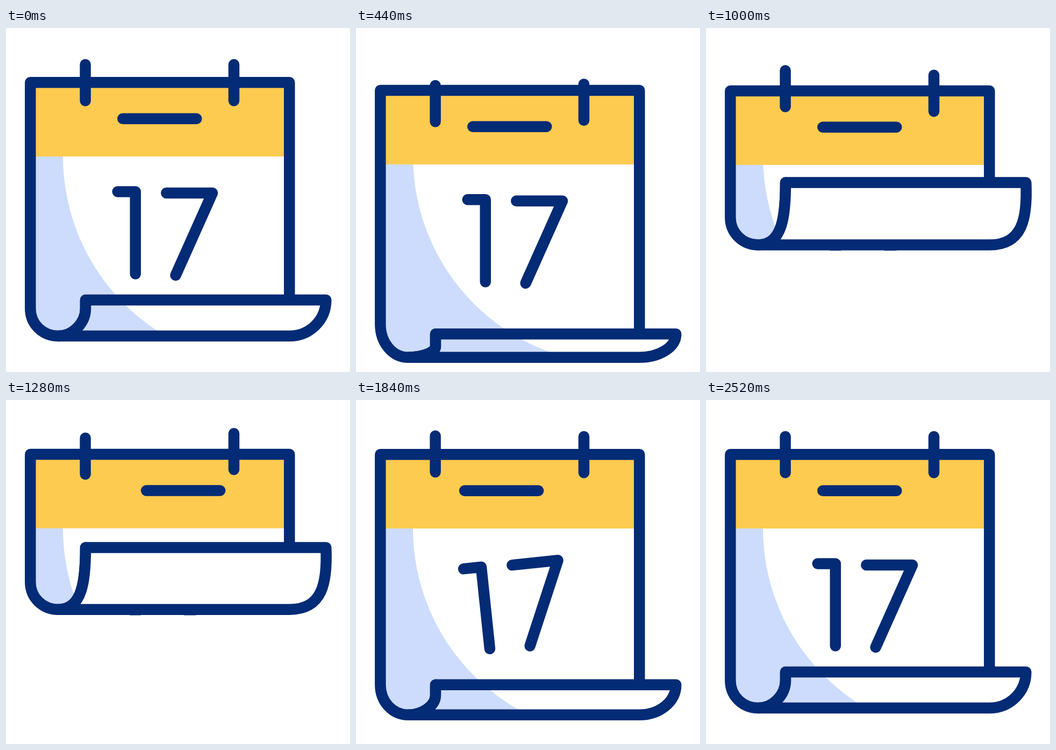
An HTML page with a canvas that plays this animation: 640 px wide and 640 px high, repeating every 2.88 s.

```html
<!DOCTYPE html>
<html lang="en">
<head>
<meta charset="utf-8">
<title>Calendar</title>
<style>
  html, body { margin: 0; width: 100%; height: 100%; overflow: hidden; background: #fff; }
  canvas { display: block; width: 640px; height: 640px; }
</style>
</head>
<body>
<canvas id="stage" width="640" height="640"></canvas>
<script>
const ctx = document.getElementById('stage').getContext('2d');
const NAVY = '#042b75', YELLOW = '#fdcb50', SHADE = '#cddcfc';
const LOOP = 2880, STEP = 40;
const TOP = 101.3, LEFT = 45.3, RIGHT = 527.3, CURL = 148, TIP = 595.3, BASE = 97;

// Symmetric cubic-bezier(k, 0, 1 - k, 1)
function ease(u, k) {
  let lo = 0, hi = 1, s = u;
  for (let i = 0; i < 24; i++) {
    s = (lo + hi) / 2;
    const x = 3 * (1 - s) * s * ((1 - s) * k + s * (1 - k)) + s * s * s;
    if (x < u) lo = s; else hi = s;
  }
  return s * s * (3 - 2 * s);
}

// Eases through values at the given times, holding outside them.
function track(times, values, k) {
  return t => {
    const i = times.findIndex(x => x > t);
    if (i === 0) return values[0];
    if (i < 0) return values[values.length - 1];
    const a = values[i - 1], b = values[i];
    return a + (b - a) * ease((t - times[i - 1]) / (times[i] - times[i - 1]), k);
  };
}

const BEATS = [0, 395, 690, 1050, 1450, 1830];
const bob = track(BEATS, [0, 17.8, -30.5, 18.3, -12.2, 0], 1 / 3);
const hop = track(BEATS, [0, 39, -46, 26, -31, 0], 1 / 3);
const slide = track([1095, 1945], [0, 361], 1 / 3);

const TURNS = [0, 315, 945, 1230, 1745, 1930];
const rollDrop = track(TURNS, [471.7, 508, 286.5, 286.5, 499, 471.7], 0.57);
const rollHeight = track(TURNS, [67, 39.5, 116, 116, 43.5, 67], 0.57);

// Damped sway of the date, in radians
function sway(t) {
  if (t < 1200 || t > 2480) return 0;
  const fade = Math.sin(Math.PI * (t - 1200) / 1280);
  return -0.1056 * fade * Math.sin(2 * Math.PI * (t - 1592) / 920);
}

function line(...pts) {
  ctx.beginPath();
  for (let i = 0; i < pts.length; i += 2) ctx.lineTo(pts[i], pts[i + 1]);
  ctx.stroke();
}

function clipRect(x, y, w, h) {
  ctx.beginPath();
  ctx.rect(x, y, w, h);
  ctx.clip();
}

// Fills a shape with white, shaded outside a large fixed circle.
function paper(path) {
  ctx.save();
  ctx.clip(path);
  ctx.fillStyle = SHADE;
  ctx.fillRect(0, 0, 640, 640);
  ctx.fillStyle = '#fff';
  ctx.beginPath();
  ctx.arc(493.5, 239, 387.5, 0, 2 * Math.PI);
  ctx.rect(493.5, 0, 146.5, 640);
  ctx.fill();
  ctx.restore();
}

function paths(top, base, height) {
  const lip = base - height;
  const open = Math.max(0, (height - 67) / 49);
  const bend = 51 + 0.45 * Math.max(0, 67 - height);
  const curl = height - 0.32 * (116 - height);

  const addCurl = p => {
    p.bezierCurveTo(BASE + 28 + 18 * open, base, CURL, base - curl * 0.48, CURL, base - curl);
    p.lineTo(CURL, lip);
  };
  const sheet = new Path2D();
  sheet.moveTo(RIGHT, lip);
  sheet.lineTo(RIGHT, top);
  sheet.lineTo(LEFT, top);
  sheet.lineTo(LEFT, base - bend);
  sheet.bezierCurveTo(LEFT, base - bend * 0.43, BASE - 28.5, base, BASE, base);
  addCurl(sheet);

  const roll = new Path2D();
  roll.moveTo(CURL, lip);
  roll.lineTo(TIP, lip);
  roll.bezierCurveTo(TIP + 3 * open, lip + height * 0.57, RIGHT + 37 + 25 * open, base, RIGHT, base);
  roll.lineTo(BASE, base);
  addCurl(roll);
  roll.closePath();
  return { sheet, roll };
}

function draw(t) {
  const dy = bob(t), top = TOP + dy;
  const base = top + rollDrop(t);
  const { sheet, roll } = paths(top, base, rollHeight(t));

  ctx.fillStyle = '#fff';
  ctx.fillRect(0, 0, 640, 640);
  ctx.strokeStyle = NAVY;
  ctx.lineWidth = 20.5;
  ctx.lineCap = ctx.lineJoin = 'round';

  paper(sheet);
  ctx.fillStyle = YELLOW;
  ctx.fillRect(LEFT, top, RIGHT - LEFT, 137.7);

  // Dash leaves on the right and comes back in from the left
  ctx.save();
  clipRect(55, top, 462, 137);
  for (const x of [217.3, -143.7]) {
    line(x + slide(t), top + 67.5, x + slide(t) + 137, top + 67.5);
  }
  ctx.restore();

  // Date
  ctx.save();
  clipRect(0, 0, 640, base + 10.8);
  ctx.translate(296, 382.5 + dy);
  ctx.rotate(sway(t));
  line(-88.3, -78, -55.2, -78, -55.2, 75);
  line(2.3, -75.5, 88, -75.5, 19.6, 77.5);
  ctx.restore();

  ctx.stroke(sheet);
  paper(roll);
  ctx.stroke(roll);

  // Rings: the left one trails the right one
  for (const [x, lag] of [[147.6, 55], [424, 15]]) {
    const y = 68 + hop(t - lag);
    line(x, y, x, y + 67.3);
  }
}

const start = performance.now();
function tick() {
  const t = (performance.now() - start) % LOOP;
  draw(Math.floor(t / STEP) * STEP);
  requestAnimationFrame(tick);
}
tick();
</script>
</body>
</html>
```
